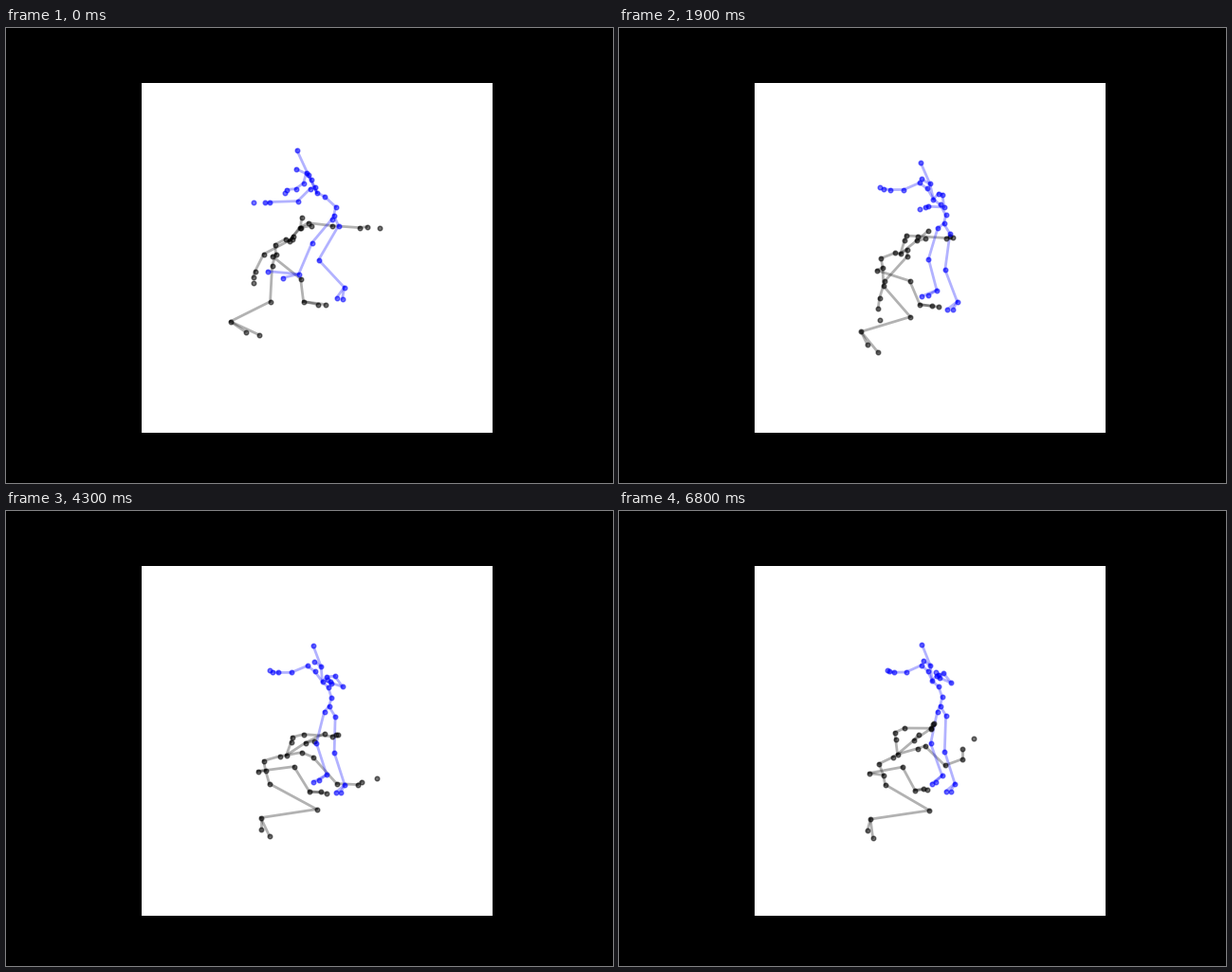
Animation of 640x480 px, one loop 6.9 s. Source, as a matplotlib script:

```python
import numpy as np
import matplotlib.pyplot as plt
from matplotlib.animation import FuncAnimation
from matplotlib.collections import LineCollection
from matplotlib.patches import Rectangle

W, H, DPI = 640, 480, 100
FRAMES, STEP = 69, 100
END = (FRAMES - 1) * STEP


def out(n):
    """Ease out; n = 1 is linear."""
    return lambda u: 1 - (1 - u) ** n


def swing(a, b, creep=0.0):
    """Smooth step between a and b, over a slow linear creep."""
    def ease(u):
        v = np.clip((u - a) / (b - a), 0, 1)
        return creep * u + (1 - creep) * v * v * (3 - 2 * v)
    return ease


class Limb:
    """A chain of joints: moves from start to rest, then drifts.

    drift: offsets of the first and last joint at the end of the loop
    dip:   depth of the downward arc on the way to rest
    sway:  sideways bow while drifting
    """

    def __init__(self, start, rest, ease_x, ease_y, drift, dip=0, sway=0):
        self.start = np.reshape(start, (-1, 2)).astype(float)
        self.move = np.reshape(rest, (-1, 2)) - self.start
        self.ease_x, self.ease_y = ease_x, ease_y
        self.depth = np.linspace(0, 1, len(self.start))
        first, last = np.array(drift, float)
        self.drift = first + self.depth[:, None] * (last - first)
        self.dip, self.sway = dip, sway

    def at(self, t, settle):
        u = min(t / settle, 1)
        v = max(t - settle, 0) / (END - settle)
        p = self.start + self.move * [self.ease_x(u), self.ease_y(u)] + v * self.drift
        p[:, 0] += self.sway * self.depth * np.sin(np.pi * v)
        p[:, 1] += self.dip * self.depth ** 1.5 * 6.75 * u * u * (1 - u)
        return p


# torso: pelvis, spine, chest, neck base, neck, head, nose
# arm: collar, shoulder, elbow, wrist, hand, fingertip
# leg: hip, knee, ankle, two toes
blue = [
    Limb([346, 198, 348, 189, 336, 178, 328, 174, 319, 155, 307, 129, 306, 149],
         [342, 207, 344, 198, 340, 187, 333, 181, 331, 165, 322, 143, 323, 160],
         out(1.4), out(4), [(-3, -1), (-2, -2)], sway=4),
    Limb([322, 160, 317, 153, 314, 164, 306, 170, 296, 171, 294, 174],
         [326, 170, 317, 164, 299, 171, 284, 171, 277, 170, 273, 168],
         out(2), out(4), [(0, -1), (10, 0)], sway=2),
    Limb([326, 168, 321, 170, 308, 183, 278, 184, 273, 184, 261, 184],
         [341, 176, 348, 176, 355, 188, 342, 185, 340, 184, 336, 183],
         out(1.3), out(2), [(-6, -2), (-2, -13)], dip=8, sway=5),
    Limb([344, 202, 323, 227, 309, 260, 292, 264, 276, 257],
         [336, 212, 327, 245, 337, 278, 328, 284, 322, 285],
         out(2.7), out(2.7), [(0, 0), (8, 3)]),
    Limb([351, 209, 330, 245, 357, 274, 355, 286, 349, 285],
         [349, 218, 347, 256, 357, 290, 352, 298, 346, 298],
         out(1.7), out(2.7), [(-4, -2), (-1, -2)], sway=3),
]

black = [
    Limb([285, 239, 284, 229, 295, 223, 299, 225, 311, 211, 312, 200, 322, 209],
         [274, 274, 272, 264, 289, 259, 296, 258, 316, 245, 336, 235, 325, 243],
         out(1.6), out(0.9), [(5, 5), (-9, -7)], sway=6),
    Limb([310, 211, 319, 206, 344, 209, 373, 211, 381, 210, 394, 211],
         [301, 244, 302, 239, 314, 236, 344, 238, 348, 236, 350, 236],
         swing(0.05, 0.3, 0.1), out(0.9), [(-9, -3), (-18, -12)]),
    Limb([303, 220, 302, 223, 272, 239, 263, 257, 261, 263, 261, 269],
         [312, 255, 324, 260, 349, 288, 371, 289, 375, 286, 391, 282],
         swing(0.58, 0.86, 0.25), out(0.9), [(3, -4), (-17, -42)], dip=46),
    Limb([281, 241, 311, 265, 314, 289, 329, 292, 337, 292],
         [266, 275, 304, 270, 320, 296, 332, 296, 338, 298],
         out(1.5), out(1), [(-2, 2), (-13, -4)], sway=14),
    Limb([281, 251, 279, 289, 237, 310, 253, 321, 267, 324],
         [278, 288, 328, 315, 269, 324, 269, 336, 278, 343],
         out(1.5), out(1.5), [(3, 1), (-10, 2)], dip=10),
]

BONES = [(0, 1), (1, 2), (2, 3), (3, 4), (4, 5), (4, 6)]
for a in (7, 13):  # fingertips stay loose
    BONES += [(3, a)] + [(k, k + 1) for k in range(a, a + 4)]
for a in (19, 24):
    BONES += [(0, a), (a, a + 1), (a + 1, a + 2), (a + 2, a + 3), (a + 2, a + 4)]
BONES = np.array(BONES)

fig = plt.figure(figsize=(W / DPI, H / DPI), dpi=DPI, facecolor="black")
ax = fig.add_axes([0, 0, 1, 1])
ax.set(xlim=(0, W), ylim=(H, 0))
ax.axis("off")
ax.add_patch(Rectangle((143.2, 57.6), 369.6, 369.6, fc="white", lw=0))


class Dancer:
    def __init__(self, limbs, settle, color, z):
        self.limbs, self.settle = limbs, settle
        self.bones = LineCollection([], colors=color, alpha=0.3, linewidths=2,
                                    capstyle="projecting", zorder=z)
        ax.add_collection(self.bones)
        self.dots = ax.scatter([], [], s=11, color=color, alpha=0.55,
                               linewidths=1, zorder=z + 2)

    def pose(self, t):
        p = np.concatenate([limb.at(t, self.settle) for limb in self.limbs]) - 0.4
        self.bones.set_segments(p[BONES])
        self.dots.set_offsets(p)
        return self.bones, self.dots


dancers = [Dancer(black, 4300, "black", 2), Dancer(blue, 2900, "blue", 3)]


def draw(i):
    return [artist for d in dancers for artist in d.pose(i * STEP)]


anim = FuncAnimation(fig, draw, frames=FRAMES, interval=STEP, repeat=True,
                     repeat_delay=0, blit=False)
plt.show()
```
